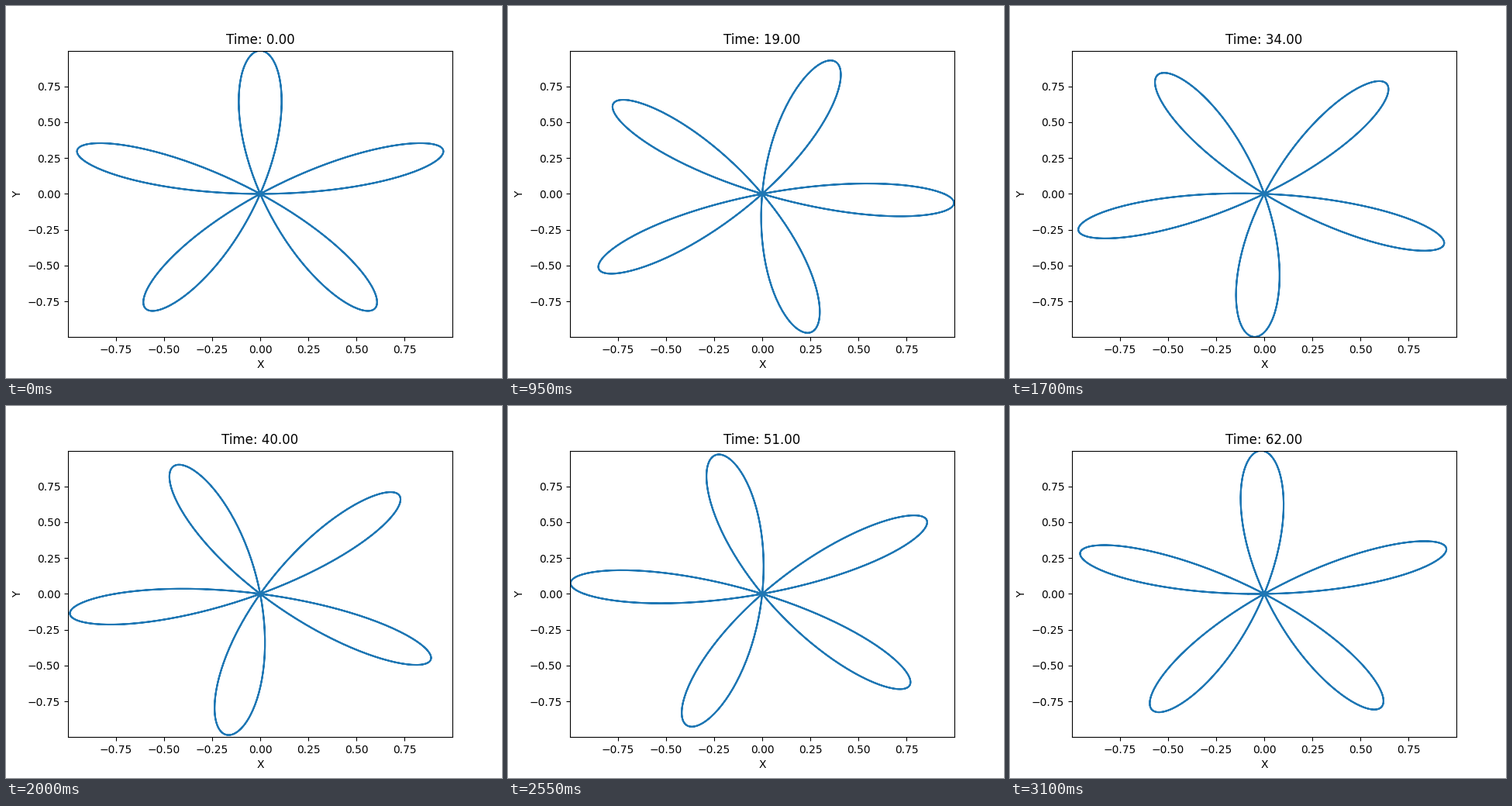
A matplotlib script for the animation above (3150 ms loop, 640 by 480 pixels).

```python
import numpy as np
import matplotlib.pyplot as plt
from matplotlib.animation import FuncAnimation

FRAMES = 63
INTERVAL = 50  # ms
PETALS = 5
PHASE_STEP = 0.1
LIMIT = 0.9999  # just inside 1, so the outermost ticks stay hidden

theta = np.linspace(0, 2 * np.pi, 1000)


def rose(phase):
    r = np.sin(PETALS * theta + phase)
    return r * np.cos(theta), r * np.sin(theta)


fig, ax = plt.subplots(figsize=(6.4, 4.8), dpi=100)
line, = ax.plot(*rose(0), color="C0", lw=1.5)
ax.set(xlim=(-LIMIT, LIMIT), ylim=(-LIMIT, LIMIT), xlabel="X", ylabel="Y")
title = ax.set_title("Time: 0.00")


def update(i):
    line.set_data(*rose(PHASE_STEP * i))
    title.set_text(f"Time: {i:.2f}")
    return line, title


anim = FuncAnimation(fig, update, frames=FRAMES, interval=INTERVAL,
                     repeat=True, repeat_delay=0, blit=False)
plt.show()
```
